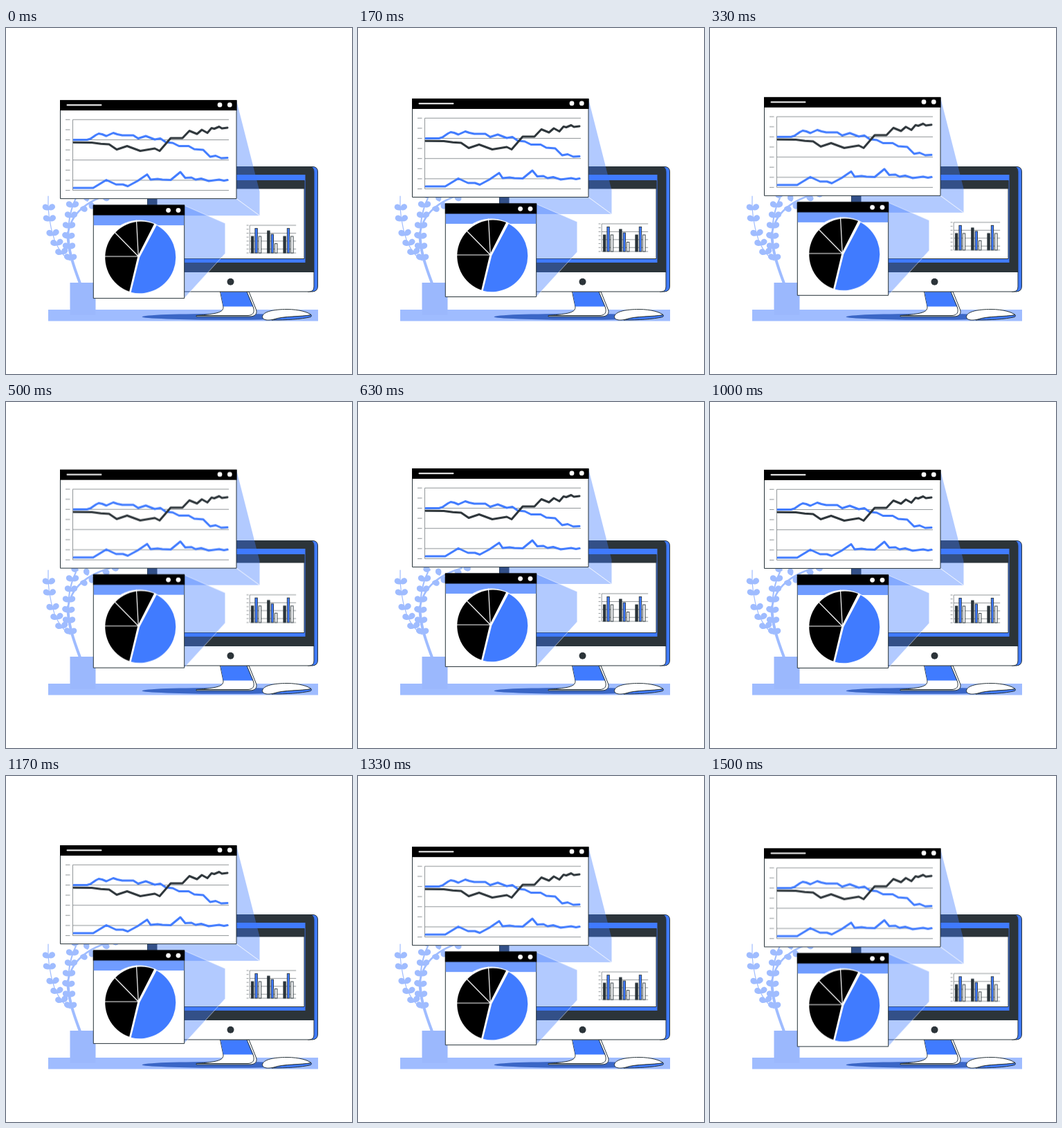
Write an HTML page that moves like this. It is 500 px wide and 500 px high and loops after 1540 ms.

```html
<!DOCTYPE html>
<html lang="en">
<head>
<meta charset="utf-8">
<title>Dashboard</title>
<style>
  html, body { margin: 0; width: 100%; height: 100%; overflow: hidden; background: #fff; }
  svg { display: block; width: 100%; height: 100%; }
  .float { animation: float 770ms linear -30ms infinite alternate; }
  @keyframes float {
    from { transform: translateY(.5px); }
    to { transform: translateY(-9.5px); }
  }
  .pale { fill: #9fbcff; }
  .stem { fill: none; stroke: #9fbcff; stroke-linecap: round; }
  .dark { fill: #2c3439; }
  .blue { fill: #407bff; }
  .white { fill: #fff; }
  .edge { stroke: #263238; stroke-width: 1; stroke-linejoin: round; }
  .beam { fill: #407bff; fill-opacity: .4; }
  .ray { fill: none; stroke: #fff; stroke-width: .9; }
  .grid { fill: none; stroke: #858b8e; stroke-width: .9; }
  .line { fill: none; stroke-width: 3; stroke-linecap: round; stroke-linejoin: round; }
</style>
</head>
<body>
<svg viewBox="0 0 500 500">
  <defs>
    <path id="leaf" d="M0 0C2 -5 6 -6 9 -4.2C11.5 -2.5 11.5 1 9 2.8C6 4.5 2 3 0 0Z"/>
  </defs>

  <!-- desk and plant -->
  <rect class="pale" x="61" y="407" width="390" height="16.5"/>
  <path class="stem" stroke-width="1.2" d="M61 243C60 262 63 285 70 306C75 318 82 330 93 336"/>
  <path class="stem" stroke-width="2" d="M101 246C93 262 90 278 90 300"/>
  <path class="stem" stroke-width="2.6" d="M89 304C90 278 104 254 150 240"/>
  <path class="stem" stroke-width="4" d="M89.500 296C89 320 98 345 107 369"/>
  <g id="leaves" class="pale"></g>
  <rect fill="#9bb8fd" x="92.500" y="368" width="37" height="46.500"/>

  <!-- stand -->
  <ellipse cx="318" cy="417.300" rx="121.500" ry="4.500" fill="#3a66c6"/>
  <path class="white edge" d="M309.500 381L314 403C314 411 306 413 275 415.500V417H352C360 417 363.500 413 361.500 407L351 381Z"/>
  <path class="blue" d="M310 381.500L314 402.500H357.500L348 381.500Z"/>
  <path class="edge" fill="none" d="M275 415.500H350C357 415 359.500 411 357.500 404L348 381"/>

  <!-- monitor -->
  <path class="blue edge" d="M436 200.500H444Q450.500 201 450.500 208V373Q450.500 380.500 443 381H436Z"/>
  <path class="dark edge" d="M210 200.500H438Q445 200.500 445 207.500V353H204.500V206Q204.500 200.500 210 200.500Z"/>
  <path class="white edge" d="M204.500 352.500H445V374Q445 381 438 381H210Q204.500 381 204.500 375Z"/>
  <rect class="blue" x="218" y="212" width="214.500" height="127"/>
  <rect class="white edge" x="218" y="220.500" width="213" height="113"/>
  <rect class="dark" x="218" y="220" width="213.500" height="12.500"/>
  <circle class="dark" cx="324.500" cy="366.700" r="5"/>

  <!-- mouse -->
  <path class="blue edge" d="M384 422C399 416 426 417 441 414.500Q442 416.500 440.500 417.500C426 421 405 422 384 422Z"/>
  <path class="white edge" d="M370.500 417.500C371 409.500 388 406.500 406 406.500C424 406.500 437 411 441 414.500C426 417.500 401 416 387 421C379 423 371 422.500 370.500 417.500Z"/>

  <g class="float">
    <path class="beam" d="M333 104.500L366.500 236V271H204.500V246.500H333Z"/>
    <path class="ray" d="M333 246.500L366.500 271"/>
    <path class="beam" d="M258 256.500L316.500 282V326L258 390Z"/>
    <path class="ray" d="M258 256.500L316.500 282M316.500 326L258 390" opacity=".6"/>

    <!-- bars on the screen -->
    <g id="barGrid" class="grid"></g>
    <g id="bars" stroke="#263238" stroke-width=".9"></g>

    <!-- line chart window -->
    <rect class="white edge" x="78.500" y="104.500" width="254.500" height="142"/>
    <rect x="78" y="104" width="255.500" height="15"/>
    <path d="M88.500 111.200H137.500" stroke="#fff" stroke-width="2" stroke-linecap="round"/>
    <circle class="white" cx="309" cy="110.900" r="3.400"/>
    <circle class="white" cx="323.300" cy="110.900" r="3.400"/>
    <g id="lineGrid" class="grid"></g>
    <polyline class="line" stroke="#407bff" points="98,161.500 117,161.500 122,160 130,154.500 134,152.500 139,153.500 145,156 155,151.500 161,153.500 168,155 184,155 191,159.500 202,156 215,161 223,159.500 231,165 241,166 250,170.500 264,170.500 272,175 285,176 295,186 303,184.500 311,188 320,187.500"/>
    <polyline class="line" stroke="#2c3439" points="98,165.300 124,165.500 137,167.300 149,168 160,175.500 175,170.500 194,177.500 215,174 222,177.500 238,159 255,159 265,148.500 276,153 283,147 291,151.500 297,144.500 301,145.500 308,142.500 312,145 320,144"/>
    <polyline class="line" stroke="#407bff" points="98,231 126,231 145,219.500 159,226 169,226 176,228.500 190,221 204,211.500 209,219 219,218 226,219 238,219.500 252,208 259,216.500 268,216 274,219 282,217.500 293,221 308,219 315,220.500 320,219.500"/>

    <!-- pie window -->
    <rect class="white edge" x="126.300" y="256" width="131.400" height="134.500"/>
    <rect x="126.800" y="270" width="130.400" height="15" fill="#709cff"/>
    <rect x="125.800" y="255.500" width="132.400" height="15"/>
    <circle class="white" cx="234.600" cy="263.300" r="3.400"/>
    <circle class="white" cx="249" cy="263.300" r="3.400"/>
    <circle class="white" cx="192.500" cy="330.500" r="53"/>
    <path d="M191.300 330L179 381A52 52 0 1 1 215 283.500Z"/>
    <path d="M191.300 330H139M191.300 330L155 293M191.300 330L188.500 277.500" stroke="#fff" stroke-width="1.200"/>
    <path d="M215.500 282.500L191.300 330L178.800 382.500" fill="none" stroke="#fff" stroke-width="2"/>
    <path class="blue" d="M193.300 331L217.600 285A52.200 52.200 0 0 1 180.700 381.800Z"/>
  </g>
</svg>
<script>
  const $ = id => document.getElementById(id);

  // Axis, five rules and eight ticks, sharing one layout at two sizes
  function grid(id, x, y, w, h, tick, gap) {
    let d = `M${x} ${y}V${y + h}`;
    for (let i = 0; i < 8; i++) {
      const ty = y + h * i / 7;
      d += `M${x - gap - tick} ${ty}h${tick}`;
      if (i % 2 === 0 || i === 7) d += `M${x} ${ty}h${w}`;
    }
    $(id).innerHTML = `<path d="${d}"/>`;
  }
  grid('lineGrid', 96.5, 132.3, 225.5, 102.2, 6.5, 4);
  grid('barGrid', 352.2, 285, 67, 40, 3, 1.6);

  const fills = ['#2c3439', '#407bff', '#fff'];
  const groups = [[301, 289.5, 301], [293, 298, 311.5], [301, 289.5, 301]];
  $('bars').innerHTML = groups.map((tops, g) => tops.map((y, i) =>
    `<rect x="${354.5 + g * 23.2 + i * 5.4}" y="${y}" width="3.4" height="${325 - y}" fill="${fills[i]}"/>`
  ).join('')).join('');

  const leaf = (x, y, a, s = 1) =>
    `<use href="#leaf" transform="translate(${x} ${y}) rotate(${a}) scale(1 ${s})"/>`;
  const pair = ([x, y, tilt]) => leaf(x, y, tilt - 38) + leaf(x, y, tilt - 146, -1);
  const nodes = [
    [62, 263, 0], [63, 279, 0], [68, 300, -4], [74, 314, -6], [81, 327, -8],
    [96, 259, 2], [94, 274, 2], [91, 289, 2], [90, 304, 6], [91, 319, 2], [93, 335, 4]
  ];
  const singles = [
    [107, 260, 20], [122, 251, 80], [139, 244, 25], [152, 240, 10],
    [105, 243, -160], [118, 251, -100]
  ];
  $('leaves').innerHTML = nodes.map(pair).join('') + singles.map(p => leaf(...p)).join('');
</script>
</body>
</html>
```
